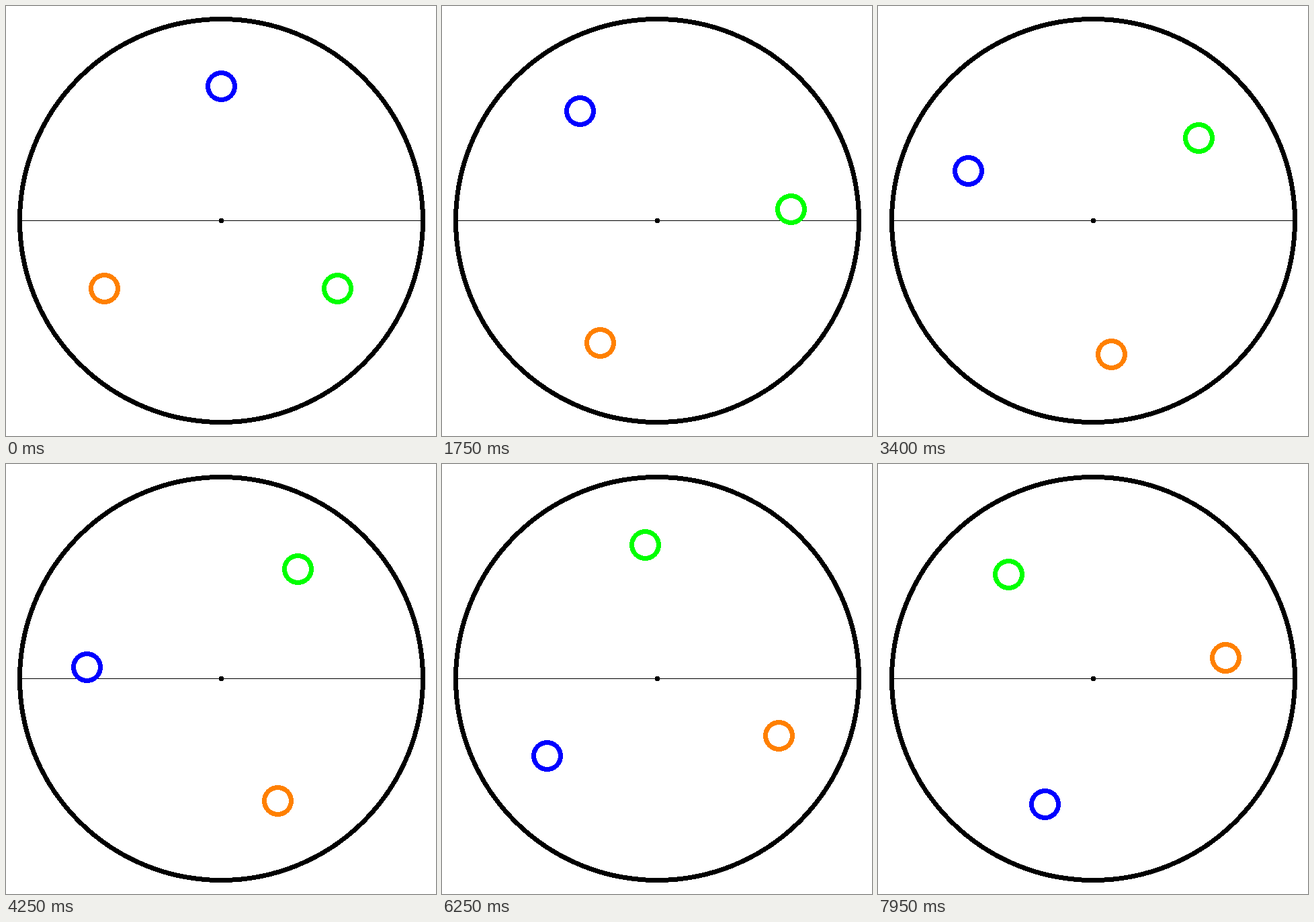
Animation, 640 px wide and 640 px high, one loop 8000 ms. Source, as an HTML page:

```html
<!DOCTYPE html>
<html lang="en">
<head>
<meta charset="utf-8">
<title>Orbiting rings</title>
<style>
  html, body { margin: 0; width: 100%; height: 100%; overflow: hidden; background: #fff; }
  svg { display: block; width: 100%; height: 100%; }
</style>
</head>
<body>
<svg viewBox="0 0 640 640" fill="none" stroke-width="7" shape-rendering="crispEdges">
  <circle cx="320.5" cy="319.5" r="300" stroke="#000"/>
  <rect x="20" y="319" width="601" height="1" fill="#000"/>
  <circle cx="320.5" cy="319.5" r="3.8" fill="#000"/>
  <circle class="ring" r="20" stroke="#00f"/>
  <circle class="ring" r="20" stroke="#ff8000"/>
  <circle class="ring" r="20" stroke="#0f0"/>
</svg>
<script>
  const LOOP = 8000, STEP = 50, ORBIT = 200, CENTER = 320;
  const rings = document.querySelectorAll('.ring');

  // One degree counterclockwise per step, snapped to whole pixels with y pointing up.
  function draw(time) {
    const turn = Math.floor((time % LOOP) / STEP);
    rings.forEach((ring, i) => {
      const angle = (90 + 120 * i + turn) * Math.PI / 180;
      const x = Math.floor(CENTER + ORBIT * Math.cos(angle));
      const y = Math.floor(CENTER + ORBIT * Math.sin(angle));
      ring.setAttribute('cx', x + 0.5);
      ring.setAttribute('cy', 639.5 - y);
    });
  }

  const start = performance.now();
  function tick() {
    draw(performance.now() - start);
    requestAnimationFrame(tick);
  }
  tick();
</script>
</body>
</html>
```
